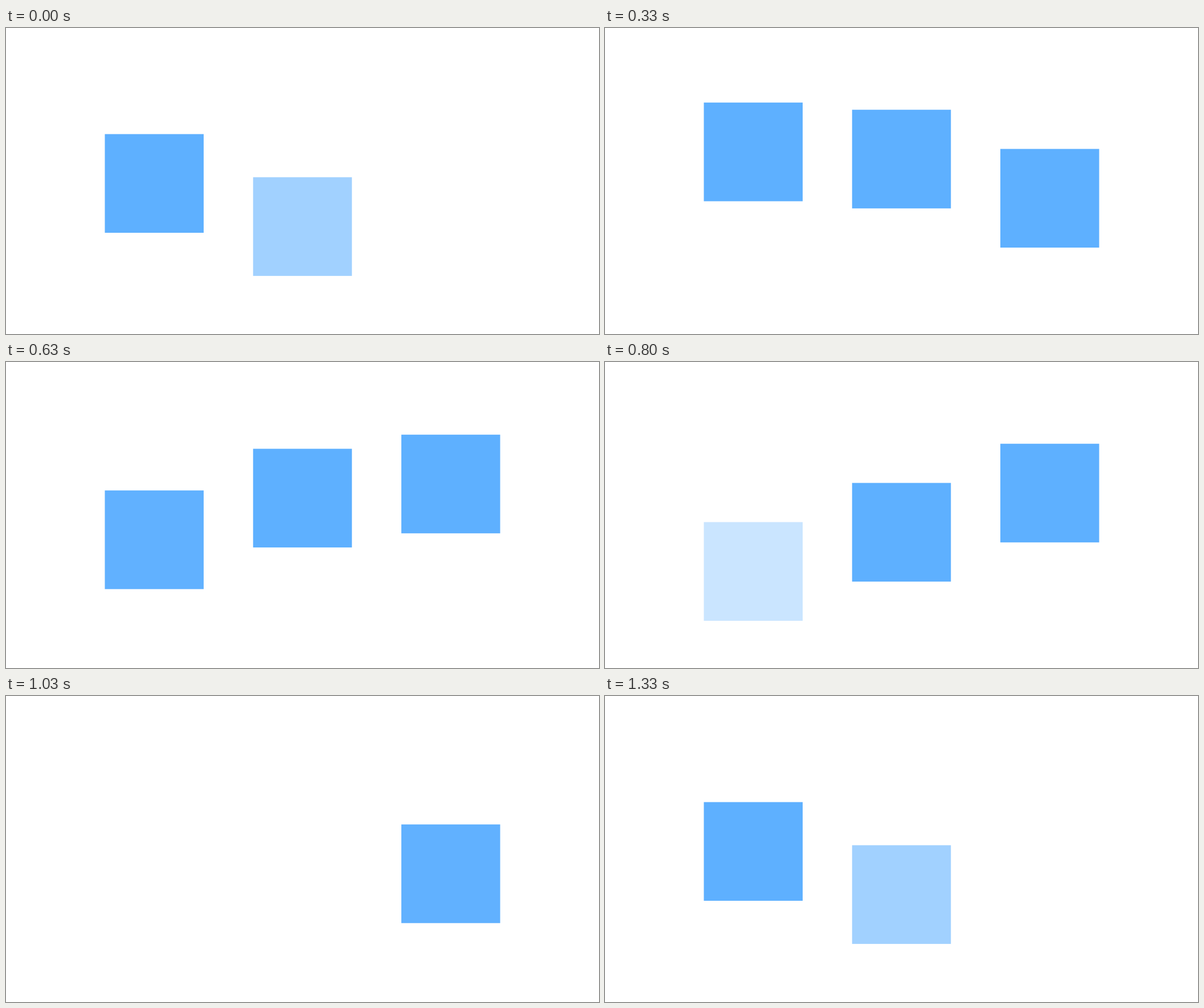
These frames come from a looping animation (1041x538 px, 1.37 s). An HTML page with a canvas:

```html
<!DOCTYPE html>
<html lang="en">
<head>
<meta charset="utf-8">
<title>Three bouncing squares</title>
<style>
  html, body { margin: 0; width: 100%; height: 100%; overflow: hidden; background: #fff; }
  canvas { display: block; }
</style>
</head>
<body>
<canvas width="1041" height="538"></canvas>
<script>
const ctx = document.querySelector('canvas').getContext('2d');
const LOOP = 1370, STEPS = 40, HALF = STEPS / 2;
const SIZE = 173.5, GAP = 260.25, TOP = 126.6, DROP = 172;

// cubic-bezier(.35, 0, .65, 1): solve x(s) = x, then return y(s)
function ease(x) {
  let s = x;
  for (let k = 0; k < 8; k++) s = (x + .15 * s * s - .1 * s ** 3) / 1.05;
  return s * s * (3 - 2 * s);
}

function draw(now) {
  // about 30 steps a second, on a 10 ms clock
  const tick = Math.floor((now % LOOP) / 10);
  const step = Math.floor(.3 * (tick + .5) + 1e-6);
  ctx.clearRect(0, 0, 1041, 538);
  ctx.fillStyle = '#5eb0ff';
  for (let n = 0; n < 3; n++) {
    // steps away from the highest point, 0 to HALF
    const phase = (step - 8 - 6 * n + 2 * STEPS) % STEPS;
    const away = Math.min(phase, STEPS - phase);
    if (away > 16) continue;
    ctx.globalAlpha = Math.min(1, (18.5 - away) * .13);
    ctx.fillRect(SIZE + n * GAP, TOP + DROP * ease(away / HALF), SIZE, SIZE);
  }
}

const start = performance.now();
function frame() {
  draw(performance.now() - start);
  requestAnimationFrame(frame);
}
frame();
</script>
</body>
</html>
```
